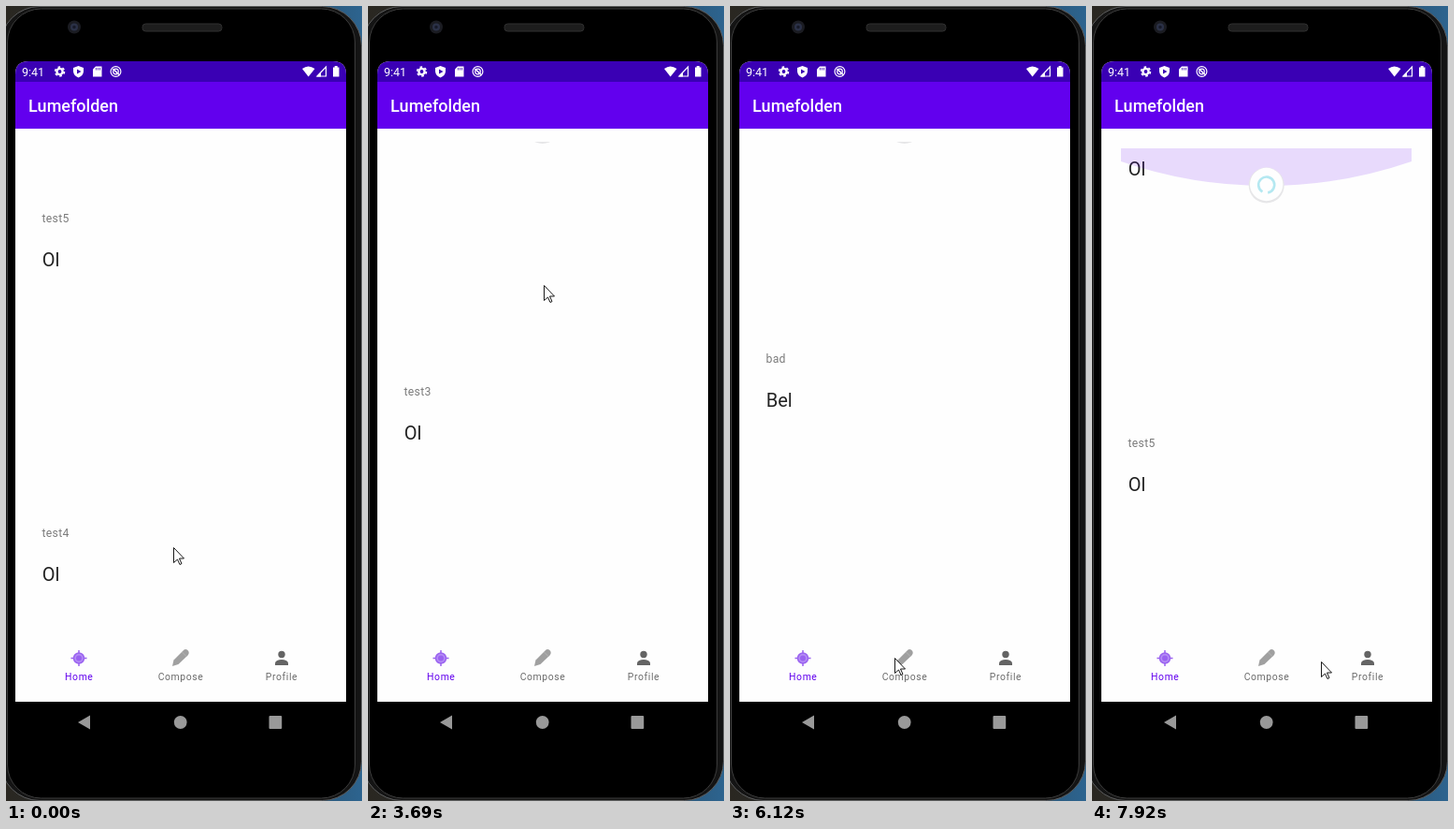
Write an HTML page that moves like this. It is 381x849 px and loops after 8 s.

```html
<!DOCTYPE html>
<html lang="en">
<head>
<meta charset="utf-8">
<title>Photo feed</title>
<style>
  html, body { margin: 0; width: 100%; height: 100%; overflow: hidden; background: #000; }
  svg { display: block; width: 381px; height: 849px; font-family: Roboto, sans-serif; }
  .desc { font-size: 12.2px; letter-spacing: .3px; fill: #7b7b7b; }
  .name { font-size: 20px; fill: #222; }
  .tab { font-size: 10.4px; letter-spacing: .6px; text-anchor: middle; fill: #6b6b6b; }
</style>
</head>
<body>
<svg viewBox="0 0 381 849">
  <defs>
    <clipPath id="screen"><path d="M10 743V73Q10 59 24 59H350Q364 59 364 73V743Z"/></clipPath>
    <clipPath id="listClip"><rect x="31" y="152" width="311" height="520"/></clipPath>
    <clipPath id="pullClip"><rect x="10" y="145" width="354" height="527"/></clipPath>
    <linearGradient id="desk" x2="1" y2="0">
      <stop offset="0" stop-color="#2a2721"/><stop offset=".5" stop-color="#22303a"/><stop offset="1" stop-color="#2d648f"/>
    </linearGradient>
    <path id="glow" d="M31 0H342V14A478 478 0 0 1 31 14Z" fill="#6200ee" fill-opacity=".14"/>
  </defs>

  <!-- Phone body -->
  <rect width="381" height="849" fill="url(#desk)"/>
  <rect x="-6" y=".5" width="386.5" height="848" rx="42" fill="#141414" stroke="#5c5d5e"/>
  <rect x="1.500" y="3" width="372" height="843" rx="36" fill="#000" stroke="#3c3c3c"/>
  <circle cx="73" cy="22.500" r="7" fill="#1b1c22"/>
  <circle cx="73" cy="22.500" r="4" fill="#2b3147"/>
  <circle cx="73" cy="22.500" r="1.700" fill="#171a28"/>
  <rect x="146" y="19" width="85" height="8" rx="3.500" fill="#1d1d1d" stroke="#303030"/>

  <!-- Screen -->
  <g clip-path="url(#screen)">
    <rect x="10" y="59" width="354" height="684" fill="#fefefe"/>
    <rect x="10" y="59" width="354" height="22" fill="#3a00b4"/>
    <rect x="10" y="81" width="354" height="50" fill="#6200ee"/>
  </g>
  <text x="17" y="74.500" font-size="12.500" fill="#fff">9:41</text>
  <text x="24" y="113" font-size="18" font-weight="500" fill="#fff">Lumefolden</text>

  <!-- Status icons -->
  <g fill="#fff">
    <circle cx="57.500" cy="70" r="3.100" fill="none" stroke="#fff" stroke-width="2.400"/>
    <circle cx="57.500" cy="70" r="4.900" fill="none" stroke="#fff" stroke-width="1.700" stroke-dasharray="2.600 2.530"/>
    <path d="M77.500 64L83 66V70Q82.500 74.500 77.500 76.500Q72.500 74.500 72 70V66Z"/>
    <path d="M76 67.500L80.500 70L76 72.500Z" fill="#3a00b4"/>
    <path d="M96 64.500H102.500V75.500H93V67.500Z"/>
    <path d="M96.500 66V68.500M98.500 66V68.500M100.500 66V68.500" stroke="#3a00b4" stroke-width=".8"/>
    <g fill="none" stroke="#fff" stroke-width="1.200">
      <circle cx="117.500" cy="70" r="5.400"/><circle cx="117.500" cy="70" r="2.800"/>
      <path d="M114.500 67L121 73.500" stroke-width="1.600"/>
    </g>
    <path d="M317 67Q323.500 62 330.500 67L323.700 75.500Z"/>
    <path d="M342.500 65V75H333Z" fill="none" stroke="#fff" stroke-width="1.200"/>
    <path d="M337 71V75.500H332.500Z"/>
    <path d="M350 65.500H351.700V64H354.700V65.500H356.500V75.500H350Z"/>
  </g>

  <g clip-path="url(#listClip)">
    <g id="list"></g>
    <use href="#glow" id="topGlow"/>
    <use href="#glow" id="endGlow"/>
  </g>

  <!-- Refresh indicator -->
  <g clip-path="url(#pullClip)">
    <g id="pull">
      <circle cy="-18.500" r="19" fill="#e6e6e8"/>
      <circle cy="-19.500" r="17.700" fill="#fefefe"/>
      <path d="M-4.250 -11.640A8.500 8.500 0 1 1 1.500 -10.630" fill="none" stroke="#b4e8f1" stroke-width="2.600"/>
    </g>
  </g>

  <!-- Tabs -->
  <g fill="none" stroke="#9a62f0" stroke-width="1.500">
    <path d="M78 688V705M69.500 696.500H86.500"/>
    <circle cx="78" cy="696.500" r="5.500" fill="#b48cf5"/>
    <circle cx="78" cy="696.500" r="3" fill="#9a62f0" stroke="none"/>
  </g>
  <path d="M178 705L179.500 698.500L189.500 688.500Q192 686 194.500 688Q197 690.500 194.500 693.500L184.500 703Z" fill="#a0a0a0"/>
  <path d="M188.500 690L193 694.500" stroke="#b5b5b5"/>
  <g fill="#646464">
    <circle cx="295" cy="692.500" r="3.700"/>
    <path d="M288 704V701.500Q289 698 295 698Q301 698 302 701.500V704Z"/>
  </g>
  <text class="tab" x="78.300" y="719.800" style="fill:#6200ee">Home</text>
  <text class="tab" x="187" y="719.800">Compose</text>
  <text class="tab" x="295" y="719.800">Profile</text>

  <!-- System buttons -->
  <g fill="#999">
    <path d="M77 765L90 757.500V772.500Z"/>
    <circle cx="186.700" cy="765" r="6.900"/>
    <rect x="281.500" y="758" width="13.700" height="14" rx="1"/>
  </g>

  <path id="cursor" d="M.5 .5V16.500L4.500 13L7 18.500L9 17.500L6.500 12H11.500Z" fill="#fff" stroke="#000" stroke-width=".9"/>
</svg>

<script>
const LOOP = 8000;
const BEAT = 129.4;      // ms between screen refreshes
const FIRST_BEAT = 24;
const ITEM = 336.5;
const END = 1500.5;      // scroll offset of the list's end

const posts = [
  ['Ol', 'test5'], ['Ol', 'test4'], ['Ol', 'test3'],
  ['Ol', 'test2'], ['Ol', 'bad'], ['Bel', 'headshot']
];

// Each swipe: from beat, to beat, scroll offset reached
const swipes = [
  [9, 15, 0], [18.55, 25, 393], [25, 31.86, 911], [34.5, 41, END],
  [46, 49, 1375], [49, 53, 1049.5], [53, 60, 0]
];

// Turning points of the pointer: beat, x, y
const turns = [
  [2, 179, 578], [4, 178, 487], [6, 177, 487], [11, 143, 702], [12, 142, 680],
  [14, 173, 579], [17.9, 175, 511], [22, 191, 207], [24.5, 193, 645],
  [28, 188, 298], [33, 217, 613], [41, 214, 196], [47, 176, 696],
  [49.5, 176, 392], [51, 188, 725], [53, 208, 364], [56.5, 222, 800], [61, 245, 700]
];

const ramp = (b, from, to) => Math.min(1, Math.max(0, (b - from) / (to - from)));
const bump = (b, from, to) => Math.sin(Math.PI * ramp(b, from, to));
const smooth = p => p * p * (3 - 2 * p);
const fling = p => 1 - (1 - p) ** 1.8;
const mix = (a, b, p) => a + (b - a) * p;

const scrollAt = b => swipes.reduce(
  (pos, [from, to, goal]) => mix(pos, goal, fling(ramp(b, from, to))), 240);

function pointerAt(b) {
  const i = Math.max(1, turns.findIndex(turn => turn[0] >= b));
  const [from, x0, y0] = turns[i - 1];
  const [to, x1, y1] = turns[i];
  const p = smooth(ramp(b, from, to));
  return [mix(x0, x1, p), mix(y0, y1, p)];
}

// Bottom edge of the refresh disc: hidden, a short tug, then pulled out
const pullAt = b => b < 15 ? 140 : 146.5 + 25 * bump(b, 14, 18) + 63.5 * ramp(b, 59, 61);

const el = id => document.getElementById(id);
const place = (id, x, y, extra = '') =>
  el(id).setAttribute('transform', `translate(${x} ${y}) ${extra}`);

el('list').innerHTML = posts.map(([name, desc], i) =>
  `<text class="name" x="38.7" y="${181 + ITEM * i}">${name}</text>` +
  `<text class="desc" x="38.5" y="${470.5 + ITEM * i}">${desc}</text>`).join('');

function setGlow(id, y, dir, level) {
  place(id, 0, y, `scale(1 ${dir * level})`);
  el(id).setAttribute('opacity', level);
}

function draw(time) {
  const beat = Math.max(0, Math.floor((time % LOOP - FIRST_BEAT) / BEAT));
  const [x, y] = pointerAt(beat);
  place('cursor', Math.round(x), Math.round(y));
  place('list', 0, -scrollAt(beat));
  place('pull', 186.7, pullAt(beat));
  setGlow('topGlow', 152, 1, ramp(beat, 59, 61));
  setGlow('endGlow', 672, -1, bump(beat, 41, 45));
}

const start = performance.now();
function loop() {
  draw(performance.now() - start);
  requestAnimationFrame(loop);
}
loop();
</script>
</body>
</html>
```
